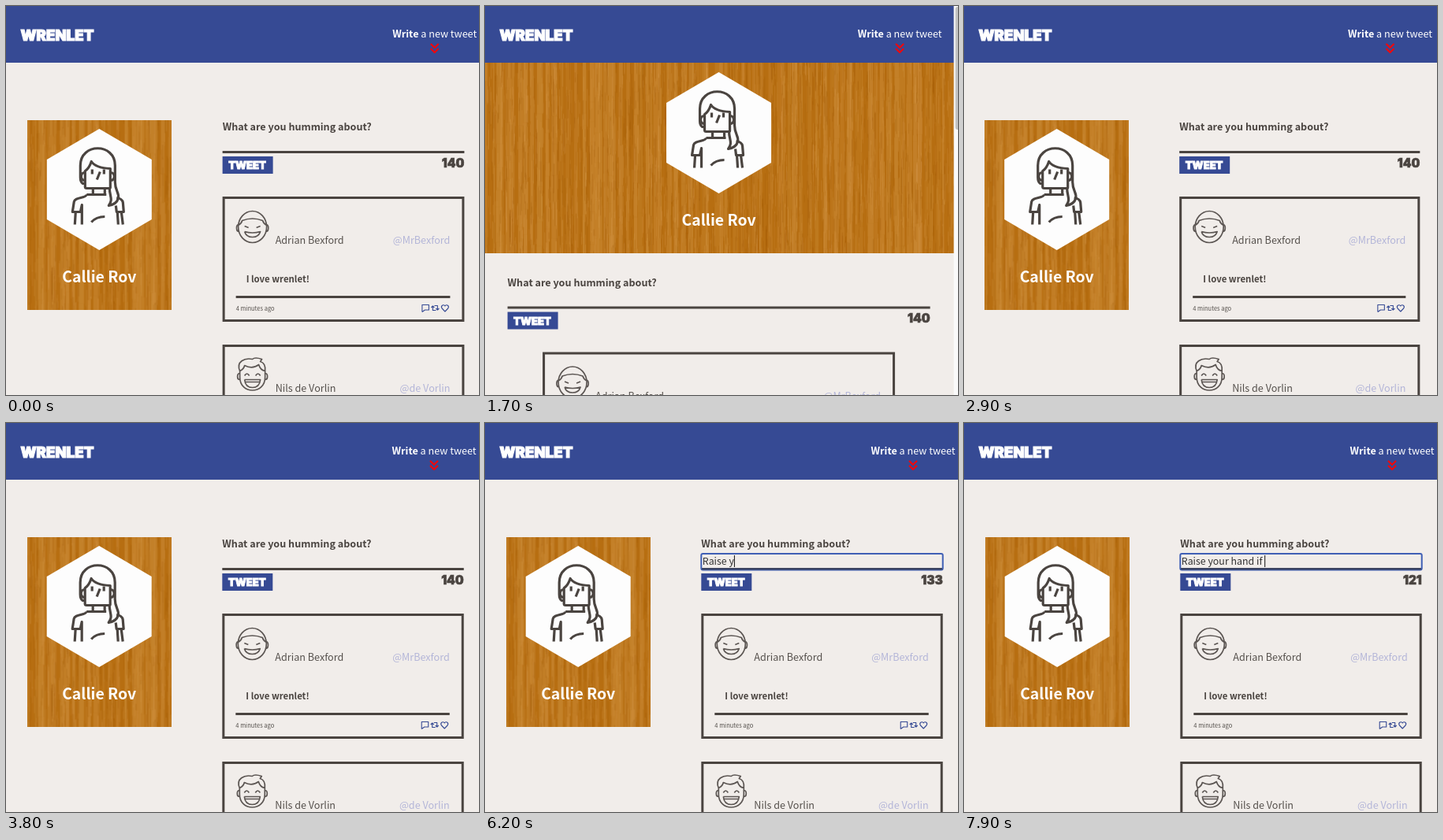
Animation, 600 px wide and 494 px high, one loop 8000 ms. Source, as an HTML page with a canvas:

```html
<!DOCTYPE html>
<html lang="en">
<head>
<meta charset="utf-8">
<style>
html, body { margin: 0; width: 100%; height: 100%; overflow: hidden; background: #f1edea; }
canvas { display: block; }
</style>
</head>
<body>
<canvas id="stage" width="600" height="494"></canvas>
<script>
const ctx = document.getElementById('stage').getContext('2d');
const SANS = '"Noto Sans CJK JP", "Noto Sans CJK SC", "Open Sans", sans-serif';
const HEAVY = 'Inter, "Liberation Sans", sans-serif';
const BLUE = '#364a94', DARK = '#4a4440', PAPER = '#f1edea', LILAC = '#b3b5d8';
const LOOP = 8000, TYPED = 'Raise your hand if ';
const FOCUS = 4290, TYPE_START = 5290, KEY_TIME = 140;

// Page width over time: [ms, px]
const WIDTHS = [[0, 610.7], [95, 610.7], [96, 610], [1690, 610], [1691, 593],
  [2500, 602.5], [2900, 607.5], [3400, 610], [LOOP, 610]];

function pageWidth(t) {
  const i = WIDTHS.findIndex(([time]) => time > t);
  const [t0, w0] = WIDTHS[i - 1], [t1, w1] = WIDTHS[i];
  return w0 + (w1 - w0) * (t - t0) / (t1 - t0);
}

function text(str, x, y, size, color, { weight = 400, align = 'left', font = SANS, swell = 0 } = {}) {
  ctx.font = `${weight} ${size}px ${font}`;
  ctx.textAlign = align;
  ctx.fillStyle = ctx.strokeStyle = color;
  ctx.fillText(str, x, y);
  if (swell) {
    ctx.lineWidth = swell;
    ctx.lineJoin = 'miter';
    ctx.strokeText(str, x, y);
  }
  return ctx.measureText(str).width;
}

function rect(x, y, w, h, color) {
  ctx.fillStyle = color;
  ctx.fillRect(x, y, w, h);
}

// Strokes an SVG path whose origin sits at x, y
function line(d, x, y, color, width) {
  ctx.save();
  ctx.translate(x, y);
  ctx.strokeStyle = color;
  ctx.lineWidth = width;
  ctx.lineJoin = 'round';
  ctx.lineCap = 'butt';
  ctx.stroke(new Path2D(d));
  ctx.restore();
}

function makeWood() {
  const wood = document.createElement('canvas');
  wood.width = 620;
  wood.height = 242;
  const g = wood.getContext('2d');
  let seed = 11;
  const rnd = () => (seed = seed * 16807 % 2147483647) / 2147483647;
  g.fillStyle = '#b76e11';
  g.fillRect(0, 0, 620, 242);
  // Straight pale bands, each broken into long pieces of slightly different width
  for (let x = 0; x < 620; x += 4 + rnd() * 8) {
    const w = 2 + rnd() * 5;
    g.fillStyle = `rgba(210,150,70,${0.15 + rnd() * 0.35})`;
    for (let y = 0, h; y < 242; y += h) {
      h = 12 + rnd() * 40;
      g.fillRect(x + rnd() * 0.6, y, w + rnd() * 1.4, h);
    }
  }
  // Fine grain
  for (let i = 0; i < 2200; i++) {
    g.fillStyle = rnd() < 0.5 ? 'rgba(158,88,0,.25)' : 'rgba(218,160,86,.22)';
    g.fillRect(rnd() * 620, rnd() * 270 - 30, 0.6 + rnd() * 0.8, 8 + rnd() * 40);
  }
  return wood;
}
const wood = makeWood();

const GIRL = [
  // hair, ponytail and fringe
  'M-17 70H-20Q-23 68-23 62V47C-23 18 21 18 21 47V68C21 80 27 82 25 89Q23 96 13 98C19 90 14 86 14 76',
  'M-17 74V54Q-12 51-9 42Q-4 50 15 51V75Q15 76 13 76H-15Q-17 76-17 74',
  'M-17 56Q-22 56-22 61T-17 66M15 56Q20 56 20 61T15 66',
  // neck, shirt and arms
  'M-7 76V83M8 76V83M-15 84H10M-15 84C-16 89-30 87-31 93L-33 106H-23L-21 97V122M-29 106L-30 122M23 88Q30 89 31 94L32 106H23L22 98M24 106L25 122M29 106L31 122',
  'M-9 119Q-3 112 8 112',
  // face
  'M-8 52V58M7 52V58M2 55L-2 65'
];

function profile(cx, top) {
  ctx.fillStyle = '#fdfdfd';
  ctx.beginPath();
  for (const [x, y] of [[0, 0], [66.5, 39], [66.5, 115], [0, 154], [-66.5, 115], [-66.5, 39]]) ctx.lineTo(cx + x, top + y);
  ctx.fill();
  GIRL.forEach(d => line(d, cx - 1, top - 0.5, DARK, 3.2));
  text('Callie Rov', cx, top + 195, 19.4, '#fff', { weight: 700, align: 'center' });
}

const CALM = 'M-18 0A18 20 0 1 1 18 0A18 20 0 1 1-18 0M-18-2Q-14-4-13-8Q0-13 13-8Q14-4 18-2'
  + 'M-18-3C-21-2-21 6-17 6M18-3C21-2 21 6 17 6'
  + 'M-10-1L-5 1M10-1L5 1M-10 6Q0 9 10 6Q8 13 0 13T-10 6';
const MERRY = 'M-16-5V3C-16 25 16 25 16 3V-5M-16-5C-21-17-10-22 0-20Q3-23 12-20L10-17Q17-15 16-5'
  + 'M-16-5Q-11-7-10-12Q0-7 8-13Q10-6 16-5M-16-2C-20-2-20 6-16 6M16-2C20-2 20 6 16 6'
  + 'M-10 1Q-7-4-4 1M4 1Q7-4 10 1M-10 6H10Q9 16 0 16T-10 6M-9 9H9';
const ICONS = 'M.5 9.5V.5H9V7H4L.5 9.5M14 2V7.5H18M12 4L14 2L16 4M16 1.5H20V7M18 5L20 7L22 5'
  + 'M29.5 9L25.7 5C23.5 2 27.5-1 29.5 2C31.5-1 35.5 2 33.3 5Z';

function post(left, right, top, face, name, handle, message) {
  ctx.strokeStyle = DARK;
  ctx.lineWidth = 3;
  ctx.lineJoin = 'miter';
  ctx.strokeRect(left + 1.5, top + 1.5, right - left - 3, 156);
  line(face, left + 38, top + 38.5, '#5c5653', 1.7);
  text(name, left + 67, top + 60, 12.6, '#55504c');
  text(handle, right - 18, top + 60, 12.6, LILAC, { align: 'right' });
  text(message, left + 30, top + 109, 11.4, DARK, { weight: 700 });
  rect(left + 17, top + 126, right - left - 35, 3, DARK);
  text('4 minutes ago', left + 17, top + 145, 7.5, '#55504c');
  line(ICONS, right - 54, top + 137, BLUE, 1.1);
}

function header(width) {
  rect(0, 0, 600, 72, BLUE);
  text('WRENLET', 18.5, 43.5, 18.6, '#fff', { weight: 900, font: HEAVY, swell: 1.2 });
  const end = width - 13.5;
  const rest = text(' a new tweet', end, 39.5, 12.6, '#fff', { align: 'right' });
  text('Write', end - rest, 39.5, 12.6, '#fff', { weight: 700, align: 'right' });
  line('M-5 0L0 5L5 0M-5 6L0 11L5 6', width - 67, 48, '#f0080c', 2.2);
}

function composer(left, right, dy, t) {
  const count = Math.max(0, Math.min(TYPED.length, Math.floor((t - TYPE_START) / KEY_TIME) + 1));
  text('What are you humming about?', left, 158 + dy, 12.6, DARK, { weight: 700 });
  rect(left, 184 + dy, right - left, 3, DARK);
  rect(left, 191 + dy, 64, 22, BLUE);
  text('TWEET', left + 7.5, 207 + dy, 13, '#fff', { weight: 900, font: HEAVY, swell: 0.9 });
  text(String(140 - count), right, 204.5 + dy, 15.3, DARK, { weight: 900, align: 'right', font: HEAVY, swell: 0.6 });
  if (t < FOCUS) return;

  ctx.strokeStyle = '#3f5fb5';
  ctx.lineWidth = 2;
  ctx.beginPath();
  ctx.roundRect(left, 166, right - left, 20.5, 2);
  ctx.stroke();
  rect(left + 1, 184, right - left - 2, 2.5, '#3c4460');
  const typed = text(TYPED.slice(0, count), left + 1.5, 180, 12.4, '#333');
  if (count || t < FOCUS + 490) rect(left + 1.5 + typed, 168, 1, 15, '#111');
  if (!count) line('M-2.5-5H-1Q0-5 0-4Q0-5 1-5H2.5M0-4V4M-2.5 5H-1Q0 5 0 4Q0 5 1 5H2.5M-1.5 2H1.5', 305, 178.5, '#222', 1);
}

function draw(t) {
  const width = pageWidth(t), wide = width >= 604;
  const dy = wide ? 0 : 197.5;
  const left = width * (wide ? 0.4497 : 0.0482), right = width * 0.952;
  rect(0, 0, 600, 494, PAPER);
  header(width);

  if (wide) {
    const x = width * 0.0435, w = width * 0.3005;
    ctx.drawImage(wood, 0, 0, w, 241, x, 144.5, w, 241);
    profile(x + w / 2, 156);
  } else {
    ctx.drawImage(wood, 0, 71.5);
    profile(width / 2, 84);
  }

  composer(left, right, dy, t);
  const postLeft = wide ? left : width / 2 - 223.5;
  const postRight = wide ? right : width / 2 + 223.5;
  post(postLeft, postRight, 242 + dy, CALM, 'Adrian Bexford', '@MrBexford', 'I love wrenlet!');
  post(postLeft, postRight, 430 + dy, MERRY, 'Nils de Vorlin', '@de Vorlin', '');

  if (width < 598) {
    rect(width + 1.5, 0, 20, 494, '#fafafa');
    ctx.fillStyle = '#c1c1c1';
    ctx.beginPath();
    ctx.roundRect(width + 3.5, 1, 6, 156, 3);
    ctx.fill();
  }
}

function frame() {
  draw(performance.now() % LOOP);
  requestAnimationFrame(frame);
}
frame();
</script>
</body>
</html>
```
